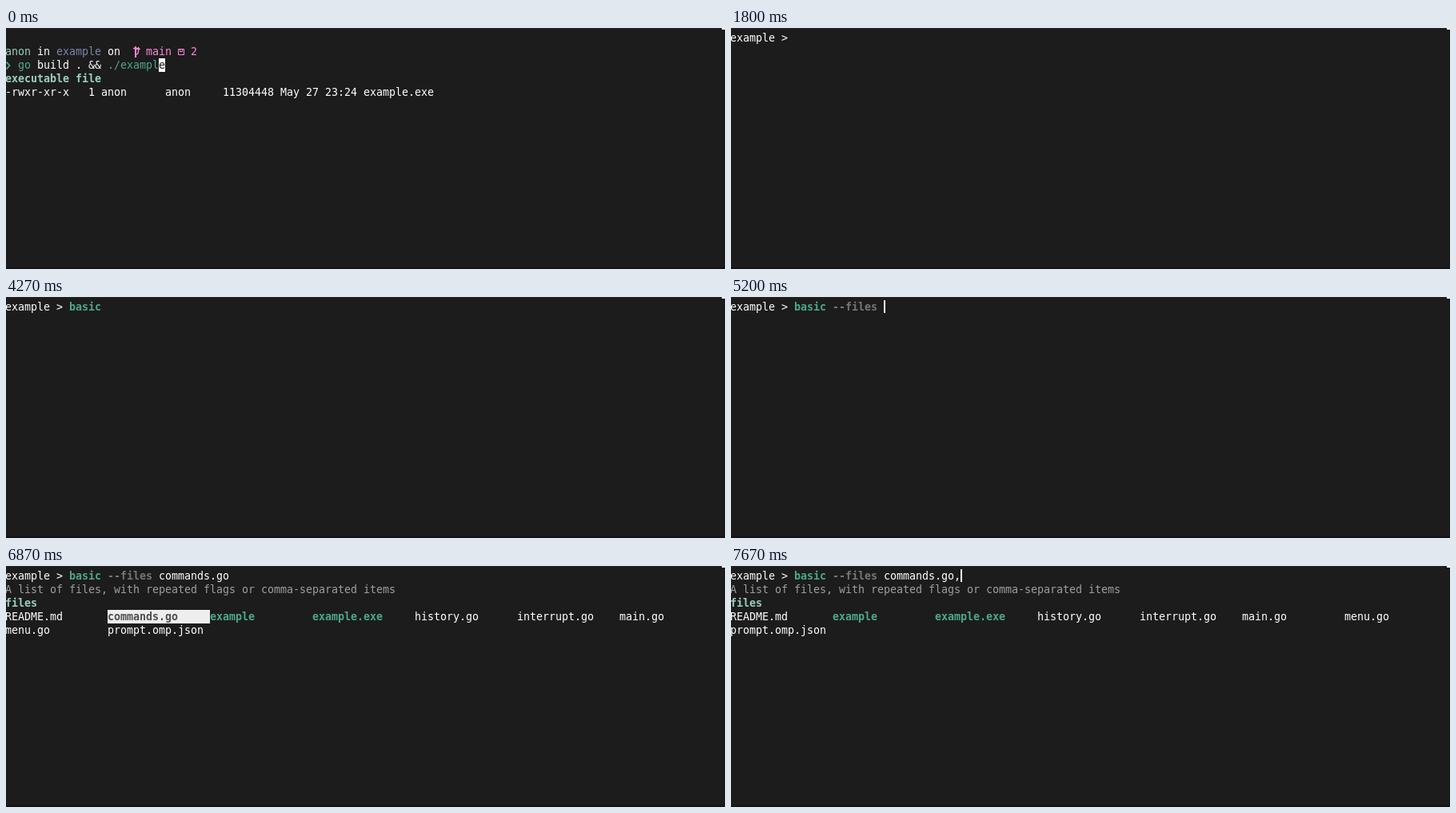
Recreate the animation shown at these times as an HTML page with a canvas. Size 899 px wide and 302 px high, loop 8000 ms.

```html
<!DOCTYPE html>
<html lang="en">
<head>
<meta charset="utf-8">
<title>Shell completion</title>
<style>
  html, body { margin: 0; width: 100%; height: 100%; overflow: hidden; background: #1c1c1c; }
  canvas { display: block; }
</style>
</head>
<body>
<canvas id="stage" width="899" height="302"></canvas>
<script>
const ctx = document.getElementById('stage').getContext('2d', { alpha: false });
const LOOP = 8000, CELL_W = 8, CELL_H = 17, LEFT = -1, TOP = 4, ASCENT = 13;
const BACK = '#1c1c1c', WHITE = '#ffffff', GREEN = '#4ca88a', MINT = '#9ccfbd',
      BLUE = '#7b85a8', PINK = '#ff87d7', HINT = '#9e9e9e', FLAG = '#767676',
      PICKED = '#eeeeee', PICKED_TEXT = '#4e4e4e';

const x = col => LEFT + col * CELL_W;
const y = row => TOP + row * CELL_H;

function rect(color, left, top, width, height) {
  ctx.fillStyle = color;
  ctx.fillRect(left, top, width, height);
}

// Every character sits in its own terminal cell.
function text(row, col, string, color = WHITE, bold = false) {
  ctx.font = `${bold ? 'bold ' : ''}13.333px "DejaVu Sans Mono", monospace`;
  ctx.fillStyle = color;
  [...string].forEach((char, i) => ctx.fillText(char, x(col + i), y(row) + ASCENT));
}

function stroke(color, width, path) {
  ctx.strokeStyle = color;
  ctx.lineWidth = width;
  ctx.stroke(new Path2D(path));
}

const bar = (row, col) => rect(WHITE, x(col), y(row), 2, 16);
const block = (row, col) => rect(WHITE, x(col), y(row), CELL_W, CELL_H);

function background() {
  rect(BACK, 0, 0, 899, 302);
  rect('#232323', 0, 0, 899, 1);
  rect('#141214', 0, 300, 899, 2);
  rect('#141214', 898, 0, 1, 302);
  rect(WHITE, 895, 0, 4, 2);
}

function shell() {
  text(1, 0, 'anon', MINT);
  text(1, 5, 'in');
  text(1, 8, 'example', BLUE);
  text(1, 16, 'on');
  stroke(PINK, 2, 'M162 23V37');
  stroke(PINK, 1.4, 'M159 25.5H164 M162 33.5C166 32.5 165.5 31 165.5 25 M163.5 27L165.5 24.5L167.5 27');
  text(1, 22, 'main', PINK);
  stroke(PINK, 1, 'M215.5 26.5H222.5V33.5H215.5Z M217.5 26.5V29.5H220.5V26.5');
  text(1, 29, '2', PINK);
  stroke(GREEN, 1.8, 'M0.5 42.5L4.5 47L0.5 51.5');
  text(2, 2, 'go', GREEN);
  text(2, 5, 'build . &&');
  text(2, 16, './example', GREEN);
}

function blockOnCommand() {
  block(2, 24);
  text(2, 24, 'e', BACK);
}

function executables() {
  text(3, 0, 'executable file', MINT, true);
  text(4, 0, '-rwxr-xr-x   1 anon      anon     11304448 May 27 23:24 example.exe');
}

function prompt(row, typed, cursor) {
  text(row, 0, 'example >');
  const [command, flag = '', value = ''] = typed.split(' ');
  const known = command === 'basic';
  text(row, 10, command, known ? GREEN : WHITE, known);
  text(row, 16, flag, FLAG, true);
  text(row, 24, value);
  if (cursor) bar(row, 10 + typed.length);
}

const FILES = ['README.md', 'commands.go', 'example', 'example.exe', 'history.go',
               'interrupt.go', 'main.go', 'menu.go', 'prompt.omp.json'];
const REMAINING = FILES.filter(name => name !== 'commands.go');

function menu(files, selected) {
  text(1, 0, 'A list of files, with repeated flags or comma-separated items', HINT);
  text(2, 0, 'files', MINT, true);
  files.forEach((name, i) => {
    const row = 3 + Math.floor(i / 7), col = i % 7 * 16;
    const runnable = name.startsWith('example'), picked = name === selected;
    if (picked) rect(PICKED, x(col), y(row), 16 * CELL_W, CELL_H);
    text(row, col, name, picked ? PICKED_TEXT : runnable ? GREEN : WHITE, runnable || picked);
  });
}

const line = (typed, cursor = true, files, selected) => () => {
  prompt(0, typed, cursor);
  if (files) menu(files, selected);
};

const scenes = [
  [0, () => { shell(); blockOnCommand(); executables(); }],
  [70, () => { shell(); blockOnCommand(); }],
  [130, () => { shell(); block(3, 0); }],
  [930, shell],
  [1270, () => { shell(); prompt(3, '', true); }],
  [1600, line('')],
  [1800, line('', false)],
  [2670, line('')],
  [3470, line('', false)],
  [3730, line('b')],
  [3870, line('ba')],
  [3930, line('bas')],
  [4070, line('basi')],
  [4200, line('basic ')],
  [4270, line('basic ', false)],
  [4470, line('basic -')],
  [4670, line('basic --')],
  [4800, line('basic --f')],
  [4930, line('basic --fi')],
  [5200, line('basic --files ')],
  [6000, line('basic --files ', false)],
  [6070, line('basic --files ', true, FILES)],
  [6400, line('basic --files README.md ', true, FILES, 'README.md')],
  [6600, line('basic --files commands.go ', true, FILES, 'commands.go')],
  [6870, line('basic --files commands.go ', false, FILES, 'commands.go')],
  [7330, line('basic --files commands.go,')],
  [7670, line('basic --files commands.go,', true, REMAINING)],
];

function frame() {
  const time = performance.now() % LOOP;
  background();
  scenes.findLast(([start]) => start <= time)[1]();
  requestAnimationFrame(frame);
}
frame();
</script>
</body>
</html>
```
